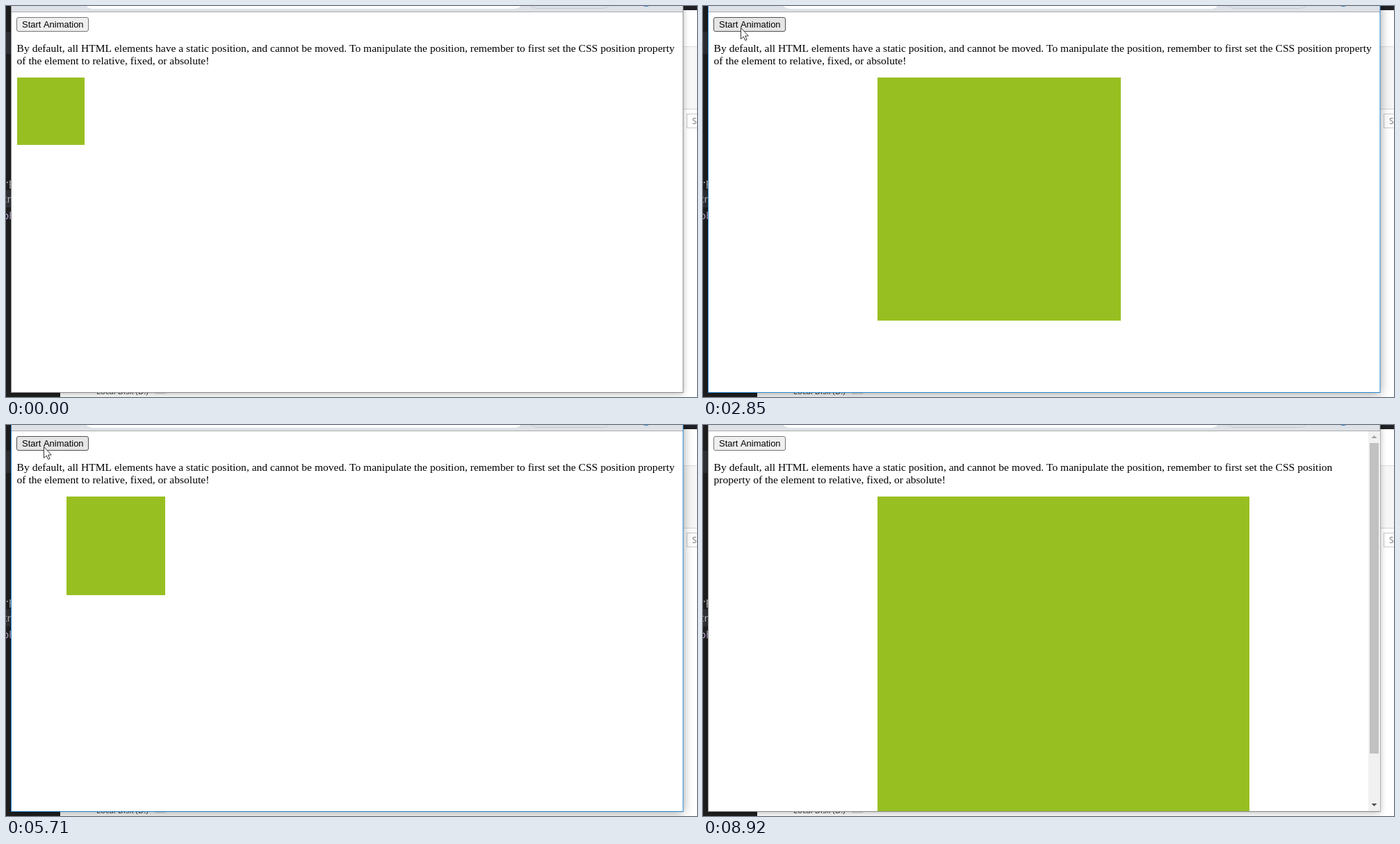
Animation, 994 px wide and 563 px high, one loop 8980 ms. Source, as an HTML page with a canvas:

```html
<!DOCTYPE html>
<html lang="en">
<head>
<meta charset="utf-8">
<title>Start Animation</title>
<style>
  html, body { margin: 0; width: 100%; height: 100%; overflow: hidden; background: #fff; }
  canvas { display: block; width: 994px; height: 563px; }
</style>
</head>
<body>
<canvas id="stage" width="994" height="563"></canvas>
<script>
const ctx = document.getElementById('stage').getContext('2d');
const LOOP = 8980, STEP = 67;
const SERIF = '15.56px "Liberation Serif", "Times New Roman", serif';
const SANS = '12.96px "Liberation Sans", Arial, sans-serif';
const GREEN = '#98bf21', GROW = 145.9;

// Each run: first visible step, then the easing start relative to it.
const runs = [[1770, -33], [2590, 6], [3430, -8], [5580, -15], [6650, -5], [7450, -8]];
const presses = [[1630, 1770], [2380, 2590], [3300, 3430], [5440, 5580], [6450, 6650], [7320, 7450]];
const halos = [[1630, 1770], [2450, 2590], [3300, 3430], [5440, 5580], [6510, 6650], [7320, 7450]];
const RESET = 4840, FOCUS = 1630, BLUR = 8920;

const clamp = v => Math.max(0, Math.min(1, v));
const mix = (a, b, u) => a + (b - a) * u;
const swing = u => 0.5 - Math.cos(Math.PI * u) / 2;
const during = (list, t) => list.some(([a, b]) => t >= a && t < b);
const snap = (t, t0) => t0 + STEP * Math.floor((t - t0 + 8) / STEP);
const bezier = (a, b, c, u) => (1 - u) ** 2 * a + 2 * u * (1 - u) * b + u * u * c;

function rect(x, y, w, h, color) {
  ctx.fillStyle = color;
  ctx.fillRect(x, y, w, h);
}

function text(str, x, y, font, color) {
  ctx.font = font;
  ctx.fillStyle = color;
  ctx.fillText(str, x, y);
}

function poly(points, fill, stroke) {
  ctx.beginPath();
  points.forEach(([x, y]) => ctx.lineTo(x, y));
  ctx.closePath();
  ctx.fillStyle = fill;
  ctx.fill();
  if (stroke) {
    ctx.strokeStyle = stroke;
    ctx.lineWidth = 1;
    ctx.stroke();
  }
}

function disc(x, y, r, color) {
  ctx.beginPath();
  ctx.arc(x, y, r, 0, Math.PI * 2);
  ctx.fillStyle = color;
  ctx.fill();
}

function boxAt(t) {
  const cycle = t < RESET ? runs.slice(0, 3) : runs.slice(3);
  const p = cycle.map(([t0, shift]) =>
    t < t0 ? 0 : swing(clamp((snap(t, t0) - t0 - shift) / 400)));
  return { x: mix(15.6, 251, p[0]), size: 97.2 + GROW * (p[0] + p[1] + p[2]) };
}

function cursorAt(t) {
  if (t < 130 || t >= BLUR) return null;
  if (t < 750) {
    const k = (1 - clamp((snap(t, 130) - 130) / 268)) ** 2;
    return [mix(6, 450, k), mix(12, 294, k)];
  }
  if (t < 1360) {
    const u = swing(clamp((snap(t, 750) - 690) / 670));
    return [bezier(6, -18, 53, u), bezier(12, 68, 31, u)];
  }
  if (t < 2380) return [53, 31];
  if (t < 7860) return [54, 31];
  const u = swing(clamp((snap(t, 7860) - 7790) / 200));
  return [mix(54, 980, u), mix(31, 260, u)];
}

function desktop() {
  rect(0, 0, 994, 563, '#fff');
  rect(0, 0, 78, 563, '#1f1f20');
  rect(0, 37, 8, 32, '#303134');
  rect(0, 265, 8, 25, '#303135');
  text('·p', 0, 259, '15px "Noto Sans", sans-serif', '#c8c8c8');
  text('tr', -4, 283, '15px "Noto Sans", sans-serif', '#b9b9b9');
  text('ph', -5, 307, '15px "Noto Sans", sans-serif', '#c3a9cb');
  rect(970, 0, 24, 6, '#202124');
  rect(970, 59, 24, 89, '#f6f6f6');
  rect(970, 58, 24, 1, '#dedede');
  rect(970, 148, 24, 1, '#d4d4d4');
  ctx.strokeStyle = '#c9c9c9';
  ctx.lineWidth = 1;
  ctx.strokeRect(979.5, 155.5, 30, 20);
  text('S', 987, 169.5, '12px "Open Sans", sans-serif', '#777');
  text('Local Disk (D:)', 130, 559, '11.5px "Open Sans", sans-serif', '#333');
  rect(214, 555, 16, 4, '#e4e4e4');
}

function frameWindow(active) {
  ctx.save();
  ctx.shadowColor = active ? 'rgba(0,0,0,.4)' : 'rgba(0,0,0,.3)';
  ctx.shadowBlur = active ? 14 : 9;
  ctx.shadowOffsetY = 2;
  rect(8, -20, 966, 576, '#fff');
  ctx.restore();
  rect(8, 0, 966, 8, '#dee1e6');
  rect(8, 8, 966, 1, '#a9abae');
  ctx.beginPath();
  ctx.roundRect(112, -22, 632, 26, 13);
  ctx.fillStyle = '#fff';
  ctx.fill();
  ctx.beginPath();
  ctx.roundRect(751.5, -22.5, 120, 26, 13);
  ctx.strokeStyle = '#c9ccd1';
  ctx.stroke();
  disc(921, -7, 8, '#1a86d8');
  ctx.strokeStyle = active ? '#2a87d0' : '#8b8c8e';
  ctx.lineWidth = 1;
  ctx.strokeRect(7.5, -20.5, 966.5, 577);
}

function scrollbar(size) {
  rect(957, 9, 17, 547, '#f1f1f1');
  const thumb = 514 * 547 / (94 + size);
  rect(959, 26, 13, thumb, '#c1c1c1');
  poly([[961.5, 19], [965.5, 15], [969.5, 19]], '#a3a3a3');
  poly([[961.5, 545], [965.5, 549], [969.5, 545]], '#505050');
}

function button(hover, pressed) {
  ctx.beginPath();
  ctx.roundRect(15.5, 16.5, 103, 20, 2.5);
  ctx.fillStyle = pressed ? '#f5f5f5' : hover ? '#e5e5e5' : '#efefef';
  ctx.fill();
  ctx.strokeStyle = pressed ? '#8d8d8d' : hover ? '#4f4f4f' : '#767676';
  ctx.lineWidth = 1;
  ctx.stroke();
  text('Start Animation', 23, 31, SANS, '#000');
}

function pointer(x, y) {
  const shape = [[0, 0], [0, 16], [3.7, 12.6], [6.2, 18], [8.6, 17], [6.2, 11.7], [10.8, 11.5]];
  poly(shape.map(([dx, dy]) => [x + dx, y + dy]), '#fff', '#333');
}

function draw(t) {
  const active = t >= FOCUS && t < BLUR;
  const box = boxAt(t), cur = cursorAt(t);
  const scrolls = 103 + box.size > 556;
  const over = cur && cur[0] > 15 && cur[0] < 119 && cur[1] > 16 && cur[1] < 37;
  const hover = over && !(t >= RESET && t < 5440);

  desktop();
  frameWindow(active);

  ctx.save();
  ctx.beginPath();
  ctx.rect(8, 9, 966, 547);
  ctx.clip();
  button(hover, during(presses, t));
  const tail = 'property';
  const first = 'By default, all HTML elements have a static position, and cannot be moved. ' +
    'To manipulate the position, remember to first set the CSS position';
  const second = 'of the element to relative, fixed, or absolute!';
  text(scrolls ? first : first + ' ' + tail, 15.6, 66, SERIF, '#000');
  text(scrolls ? tail + ' ' + second : second, 15.6, 84, SERIF, '#000');
  const left = Math.round(box.x), right = Math.round(box.x + box.size);
  rect(left, 103, right - left, Math.round(box.size), GREEN);
  if (scrolls) scrollbar(box.size);
  ctx.restore();

  if (during(halos, t)) {
    ctx.globalCompositeOperation = 'multiply';
    disc(54, 31.5, 11.5, '#fff25a');
    ctx.globalCompositeOperation = 'source-over';
  }
  if (cur) pointer(Math.round(cur[0]) + 0.5, Math.round(cur[1]) + 0.5);
}

const begin = performance.now();
function tick() {
  draw((performance.now() - begin) % LOOP);
  requestAnimationFrame(tick);
}
tick();
</script>
</body>
</html>
```
